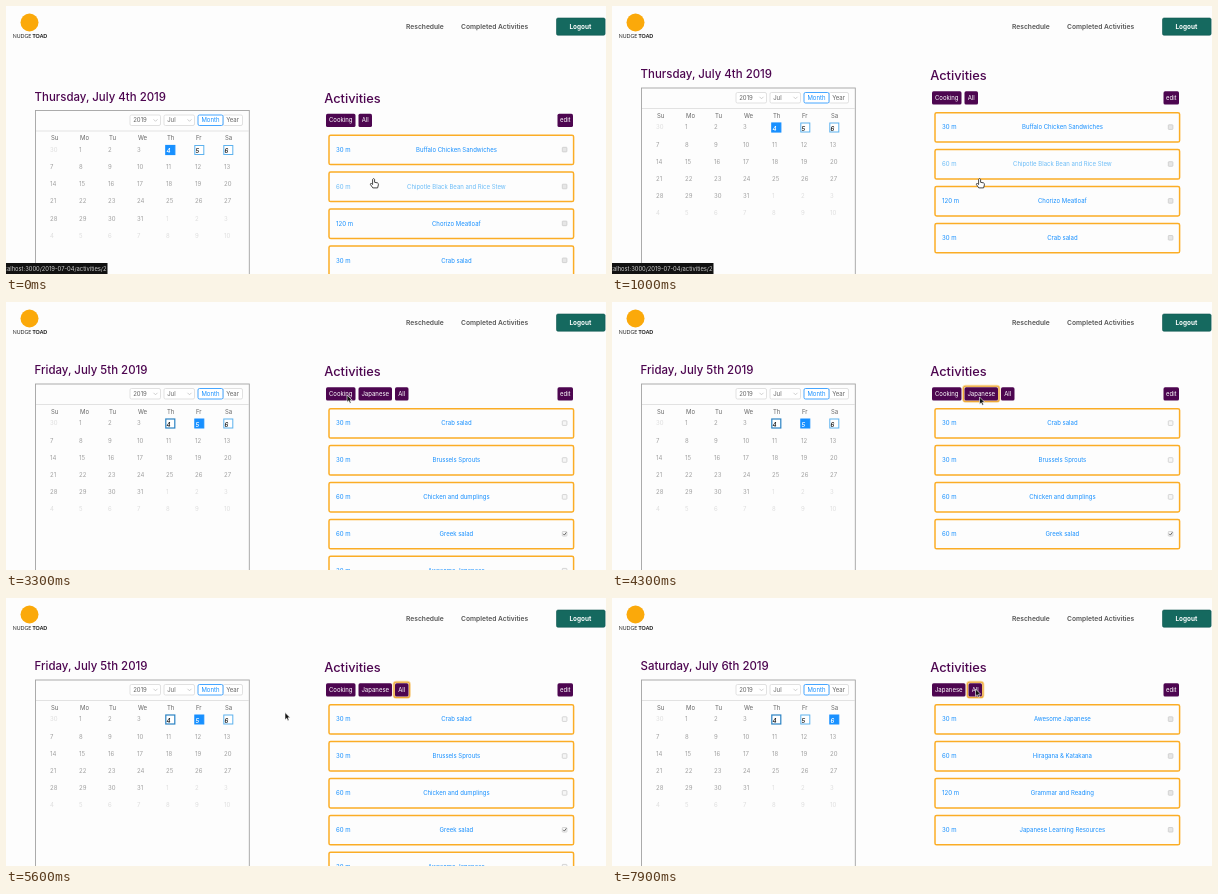
These frames come from a looping animation (600x268 px, 8 s). An HTML page:

```html
<!DOCTYPE html>
<html lang="en">
<head>
<meta charset="utf-8">
<title>Activity planner</title>
<style>
html, body { margin: 0; width: 100%; height: 100%; overflow: hidden; background: #fdfdfd; }
svg { display: block; width: 100%; height: 100%; font-family: Inter, "Open Sans", sans-serif; }
</style>
</head>
<body>
<svg id="stage" viewBox="0 0 600 268"></svg>
<script>
const LOOP = 8000, STEP = 100;
const PURPLE = '#4d0650', BLUE = '#1890ff', ORANGE = '#fbad26';

const COOKING = [[30, 'Crab salad'], [30, 'Brussels Sprouts'], [60, 'Chicken and dumplings'], [60, 'Greek salad', true]];
const JAPANESE = [[30, 'Awesome Japanese'], [60, 'Hiragana &amp; Katakana'], [120, 'Grammar and Reading'], [30, 'Japanese Learning Resources']];
const THURSDAY = [[30, 'Buffalo Chicken Sandwiches'], [60, 'Chipotle Black Bean and Rice Stew'], [120, 'Chorizo Meatloaf'], [30, 'Crab salad']];
const ALL = [...COOKING, ...JAPANESE];

// Each track holds [start time, value] pairs.
const tracks = {
  scroll: [[0, 22.5], [100, -18], [500, 0]],
  day: [[0, 4], [2200, 5], [6900, 6]],
  rows: [[0, THURSDAY], [2400, ALL], [3500, COOKING], [4400, JAPANESE], [5200, ALL], [7100, JAPANESE]],
  tags: [[0, ['Cooking', 'All']], [2400, ['Cooking', 'Japanese', 'All']], [7100, ['Japanese', 'All']]],
  focus: [[0, ''], [3500, 'Cooking'], [4300, 'Japanese'], [5000, 'All'], [6300, ''], [7800, 'All']],
  link: [[0, true], [1100, false]],
  hand: [[0, true], [1200, false], [1700, true], [2400, false], [6400, true], [7100, false]]
};
const at = (name, t) => tracks[name].findLast(([start]) => start <= t)[1];

const path = [[0, 367.6, 172.3], [1000, 367.6, 172.3], [1800, 200, 127], [2000, 198, 126], [2200, 198, 126],
  [2300, 286.3, 86], [3000, 334, 93], [3200, 335, 93], [3300, 341, 93], [3900, 341, 93], [4300, 367.5, 95],
  [4700, 369, 95], [5000, 396, 93], [5500, 396, 93], [5600, 279, 114.5], [5700, 250, 113], [5900, 248, 113],
  [6500, 222.8, 119.5], [6900, 222.8, 119.5], [7700, 363, 92], [7900, 363.5, 91]];

function cursorAt(t) {
  const i = path.findIndex(p => p[0] > t);
  if (i < 0) return path.at(-1).slice(1);
  const [t0, x0, y0] = path[i - 1], [t1, x1, y1] = path[i];
  const k = (t - t0) / (t1 - t0);
  return [x0 + (x1 - x0) * k, y0 + (y1 - y0) * k];
}

// y is the middle of the capitals
const text = (x, y, str, size, fill, more = '') =>
  `<text x="${x}" y="${y + size * .36}" font-size="${size}" fill="${fill}" ${more}>${str}</text>`;
const box = (x, y, w, h, fill, stroke = 'none', line = 1, r = 0) =>
  `<rect x="${x}" y="${y}" width="${w}" height="${h}" rx="${r}" fill="${fill}" stroke="${stroke}" stroke-width="${line}"/>`;
const stroke = (d, color, line) => `<path d="${d}" fill="none" stroke="${color}" stroke-width="${line}"/>`;
const MIDDLE = 'text-anchor="middle"';

function header() {
  return box(0, 0, 600, 42, '#fdfdfd') +
    `<circle cx="23.5" cy="16.5" r="9" fill="#fba90a"/>` +
    text(24, 30.2, 'NUDGE <tspan font-weight="800">TOAD</tspan>', 5.2, '#222', MIDDLE + ' font-family="Lato, sans-serif"') +
    text(400, 20.7, 'Reschedule', 6.7, '#555', 'font-weight="600"') +
    text(455, 20.7, 'Completed Activities', 6.7, '#555', 'font-weight="600"') +
    box(550.5, 12, 48.6, 17.2, '#15695f', '#0e574f', .6, 1.5) +
    text(574.4, 20.7, 'Logout', 6.4, '#fff', MIDDLE + ' font-weight="700"');
}

function select(x, label) {
  return box(x, 86.5, 30.5, 10.5, '#fff', '#d5d5d5', .7, 1.5) + text(x + 3.2, 91.8, label, 6, '#666') +
    stroke(`M${x + 23.5} 90.8l2 2 2-2`, '#bbb', .7);
}

function dayCell(n, col, day, hover) {
  const x = 159.8 + 29 * (col - 4), on = n === day;
  const edge = n === 4 ? '#2b83c4' : '#5db2ee';
  return box(x, 117, 9, 9, on ? BLUE : hover ? '#b3dcf0' : '#fff', on ? BLUE : edge, n === 4 ? 1.2 : 1) +
    text(x + .8, 122.8, n, 6, on ? '#fff' : '#222', 'font-style="italic" font-weight="600"');
}

function calendar(day, t) {
  let out = box(29.5, 82, 213.8, 260, '#fdfdfd', '#a3a3a3', .9) + stroke('M30 102.5H243', '#dcdcdc', .8) +
    select(124, '2019') + select(158, 'Jul') +
    box(217, 86.5, 19.5, 10.5, '#fff', '#d5d5d5', .7, 1.5) + box(192, 86.5, 25, 10.5, '#fff', BLUE, .8, 1.5) +
    text(204.5, 91.8, 'Month', 6, BLUE, MIDDLE) + text(226.6, 91.8, 'Year', 6, '#666', MIDDLE);
  ['Su', 'Mo', 'Tu', 'We', 'Th', 'Fr', 'Sa'].forEach((name, c) => out += text(45 + 29 * c, 109.5, name, 6, '#666'));
  for (let i = 0; i < 42; i++) {
    const c = i % 7, row = Math.floor(i / 7), inside = i > 0 && i < 32;
    const n = i === 0 ? 30 : inside ? i : i - 31;
    out += inside && n >= 4 && n <= 6
      ? dayCell(n, c, day, n === 6 && t >= 6400 && t < 6900)
      : text(44 + 29 * c, 121.2 + 17.2 * row, n, 6, inside ? '#a0a0a0' : '#dedede');
  }
  return out;
}

const WIDTHS = { Cooking: 29.5, Japanese: 33.5, All: 13.5, edit: 15.5 };
function tag(x, label, focused) {
  const w = WIDTHS[label];
  const ring = focused ? box(x - 1.2, 84, w + 2.4, 15.6, 'none', '#f9d9a0', 2.4, 2.5) + box(x - 1, 84.2, w + 2, 15.2, 'none', '#eda93a', 1.1, 2) : '';
  return ring + box(x, 85.3, w, 13.2, PURPLE, 'none', 0, 1.6) + text(x + w / 2, 91.8, label, 6, '#fff', MIDDLE);
}

function activity([minutes, name, done], i, hover, active) {
  const y = 121.3 + 36.9 * i, color = hover ? '#6bbcf7' : BLUE;
  return box(323, y - 14.6, 244.6, 29.4, '#fdfdfd', ORANGE, 1.5, 1.6) +
    text(330, y, minutes + ' m', 6.1, color) + text(450.4, y, name, 6, color, MIDDLE) +
    box(556.3, y - 2.5, 4.6, 4.6, active ? '#f6f6f6' : '#e6e6e6', '#c8c8c8', .7, .6) +
    (done ? stroke(`M557.2 ${y - .2}l1.2 1.3 2-2.8`, '#444', .8) : '');
}

function cursor(t) {
  const [x, y] = cursorAt(t);
  const shape = at('hand', t)
    ? '<path d="M-1 1Q0-.5 1 1V4L4 4.6Q5 5 4.8 6.5L4 9.6H-.8L-3.2 6.2Q-3.4 5-2.2 5.2L-1 6.2Z" fill="#fff" stroke="#333" stroke-width=".9"/>'
    : '<path d="M0 0V7.2L1.7 5.7 2.9 8.3 4.1 7.8 3 5.2H5.2Z" fill="#111" stroke="#fff" stroke-width=".6"/>';
  return `<g transform="translate(${x} ${y})">${shape}</g>`;
}

function draw(t) {
  const day = at('day', t), rows = at('rows', t), focus = at('focus', t), link = at('link', t);
  const name = { 4: 'Thursday', 5: 'Friday', 6: 'Saturday' }[day];
  let x = 320, tags = '';
  for (const label of at('tags', t)) {
    tags += tag(x, label, label === focus);
    x += WIDTHS[label] + 3;
  }
  const page = text(28.6, 68, `${name}, July ${day}th 2019`, 11.45, PURPLE, 'font-weight="500"') +
    text(318.2, 69.5, 'Activities', 12.8, PURPLE, 'font-weight="500"') +
    calendar(day, t) + tags + tag(551.5, 'edit') +
    rows.map((row, i) => activity(row, i, link && i === 1, rows !== THURSDAY && day === 5)).join('');
  const status = link
    ? box(0, 257, 101.5, 11, '#111') + text(100.5, 262.8, 'calhost:3000/2019-07-04/activities/2', 5.8, '#ccc', 'text-anchor="end"')
    : '';
  return `<g transform="translate(0 ${at('scroll', t)})">${page}</g>` + header() + status + cursor(t);
}

const stage = document.getElementById('stage');
const begin = performance.now();
let shown = -1;
function tick() {
  const t = Math.floor((performance.now() - begin) % LOOP / STEP) * STEP;
  if (t !== shown) stage.innerHTML = draw(shown = t);
  requestAnimationFrame(tick);
}
tick();
</script>
</body>
</html>
```
